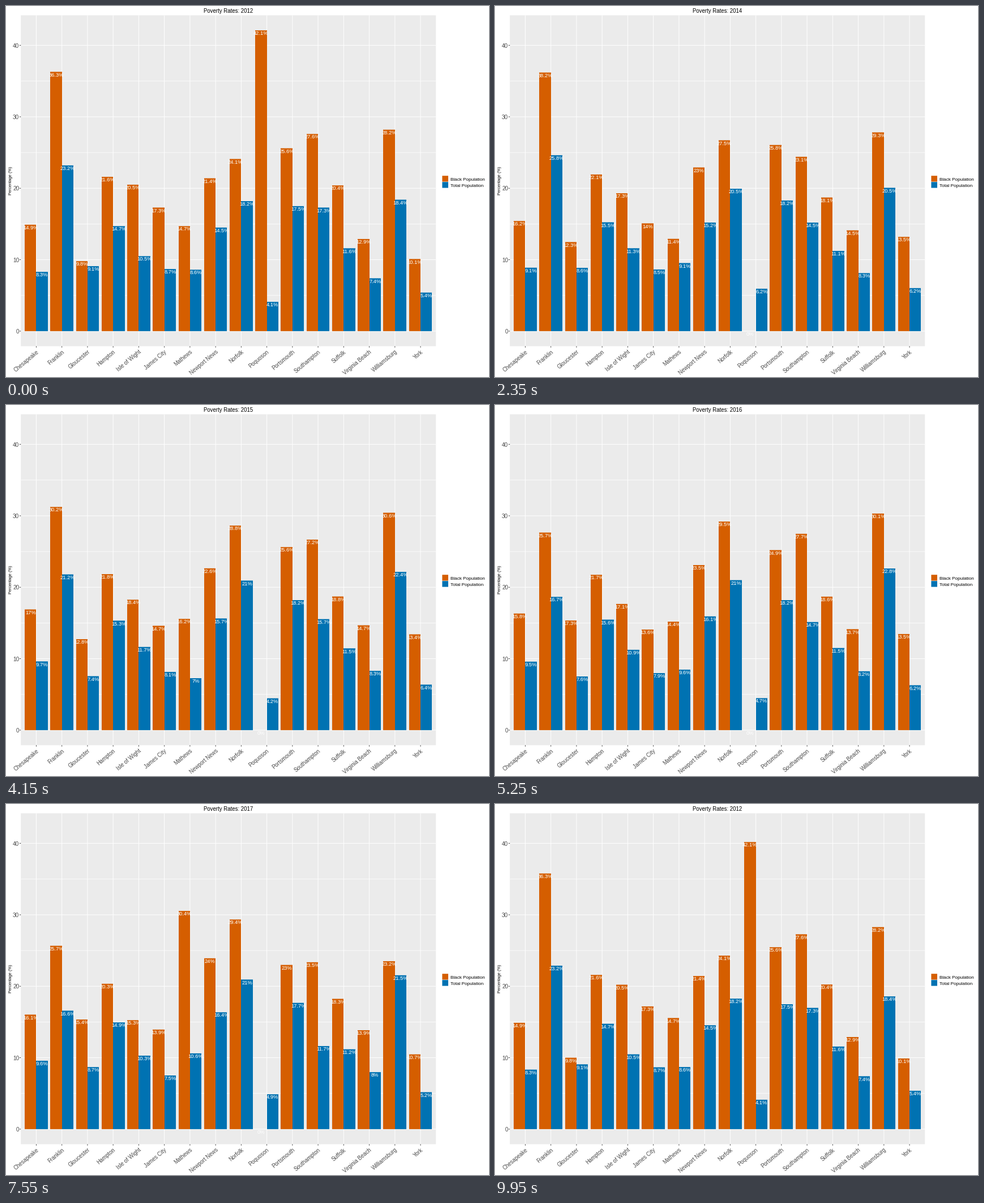
These frames come from a looping animation (853x656 px, 10000 ms). A matplotlib script:

```python
import numpy as np
import matplotlib.pyplot as plt
from matplotlib.animation import FuncAnimation
from matplotlib.patches import Rectangle

W, H, DPI = 853, 656, 100
FRAMES, INTERVAL = 200, 50
LEFT, RIGHT, TOP, BOTTOM = 26.3, 759.2, 16.5, 601.5
ORANGE, BLUE, PANEL = "#D55E00", "#0072B2", "#EBEBEB"

PLACES = ["Chesapeake", "Franklin", "Gloucester", "Hampton", "Isle of Wight",
          "James City", "Mathews", "Newport News", "Norfolk", "Poquoson",
          "Portsmouth", "Southampton", "Suffolk", "Virginia Beach",
          "Williamsburg", "York"]

# one row per year, 2012 to 2018
BLACK = np.array([
    [14.9, 36.3, 9.8, 21.6, 20.5, 17.3, 14.7, 21.4, 24.1, 42.1, 25.6, 27.6, 20.4, 12.9, 28.2, 10.1],
    [14.4, 33.6, 12.7, 21.7, 21.9, 16.5, 14.9, 22.8, 25.7, 0, 26.4, 26.1, 19.5, 13.6, 25.9, 12.8],
    [16.2, 38.2, 12.3, 22.1, 17.3, 14, 11.4, 23, 27.5, 0, 25.8, 23.1, 18.1, 14.5, 29.3, 13.5],
    [17, 30.2, 12.8, 21.8, 18.4, 14.7, 16.2, 22.6, 28.8, 0, 25.6, 27.2, 18.8, 14.7, 30.6, 13.4],
    [15.8, 25.7, 17.3, 21.7, 17.1, 13.6, 14.4, 23.5, 29.5, 0, 24.9, 27.7, 18.6, 13.7, 30.1, 13.5],
    [16.1, 25.7, 15.4, 20.3, 15.3, 13.9, 30.4, 24, 29.4, 0, 23, 23.5, 18.3, 13.9, 23.2, 10.7],
    [14.6, 25, 14.2, 21.4, 14.3, 14.7, 33.6, 22.2, 28.2, 0, 22.7, 20.5, 17, 12.8, 30, 5.6],
])
TOTAL = np.array([
    [8.3, 23.2, 9.1, 14.7, 10.5, 8.7, 8.6, 14.5, 18.2, 4.1, 17.5, 17.3, 11.6, 7.4, 18.4, 5.4],
    [8.6, 23.1, 9.2, 14.9, 12, 8.8, 10.1, 15.2, 19.2, 5.6, 18.4, 16.1, 11.4, 7.9, 19.5, 5.8],
    [9.1, 25.8, 8.6, 15.5, 11.3, 8.5, 9.1, 15.2, 20.5, 6.2, 18.2, 14.5, 11.1, 8.3, 20.5, 6.2],
    [9.7, 21.2, 7.4, 15.3, 11.7, 8.1, 7, 15.7, 21, 4.2, 18.2, 15.7, 11.5, 8.3, 22.4, 6.4],
    [9.5, 16.7, 7.6, 15.6, 10.9, 7.9, 9.6, 16.1, 21, 4.7, 18.2, 14.7, 11.5, 8.2, 22.8, 6.2],
    [9.6, 16.6, 8.7, 14.9, 10.3, 7.5, 10.6, 16.4, 21, 4.9, 17.7, 11.7, 11.2, 8, 21.5, 5.2],
    [9, 16.2, 8.5, 15.8, 10, 7.8, 10.8, 15.5, 19.7, 4.5, 17.2, 10.2, 10.8, 7.6, 22.4, 4.7],
])
YEARS = len(BLACK)

# frames where a year's hold begins and ends, and the year index there
KEYS = [0, 5, 28, 34, 57, 63, 86, 92, 115, 121, 144, 150, 172, 178, 200]
STATES = [i // 2 for i in range(len(KEYS))]

STEP = (RIGHT - LEFT) / (len(PLACES) + 0.2)
CENTRES = LEFT + STEP * (0.6 + np.arange(len(PLACES)))
Y_MAX = BLACK.max()
UNIT = (BOTTOM - TOP) / (Y_MAX * 1.1)
ZERO = BOTTOM - 0.05 * Y_MAX * UNIT

plt.rcParams["font.family"] = "Liberation Sans"
# the small surplus keeps the pixel size from rounding down
fig = plt.figure(figsize=((W + 0.01) / DPI, (H + 0.01) / DPI), dpi=DPI, facecolor="white")
ax = fig.add_axes([0, 0, 1, 1])
ax.set_xlim(0, W)
ax.set_ylim(H, 0)
ax.axis("off")


def y_px(value):
    return ZERO - value * UNIT


def box(x0, y0, x1, y1, color, z=0):
    patch = Rectangle((x0, y0), x1 - x0, y1 - y0, fc=color, lw=0, zorder=z, snap=False)
    return ax.add_patch(patch)


def line(x0, y0, x1, y1, color="white", width=0.9):
    ax.plot([x0, x1], [y0, y1], color=color, lw=width * 72 / DPI, zorder=1,
            solid_capstyle="butt", snap=False)


def write(x, y, s, px, color="black", ha="center", angle=0):
    return ax.text(x, y, s, fontsize=px * 72 / DPI, color=color, ha=ha, va="baseline",
                   rotation=angle, rotation_mode="anchor", zorder=3)


def draw_static():
    box(LEFT, TOP, RIGHT, BOTTOM, PANEL)
    for v in range(5, 41, 10):
        line(LEFT, y_px(v), RIGHT, y_px(v), width=0.8)
    for v in range(0, 41, 10):
        y = y_px(v)
        line(LEFT, y, RIGHT, y, width=1)
        line(LEFT - 2.4, y, LEFT, y, "#333333")
        write(23.2, y + 4.2, str(v), 10, "#4D4D4D", "right")
    for x, place in zip(CENTRES, PLACES):
        line(x, TOP, x, BOTTOM, width=1)
        line(x, BOTTOM, x, BOTTOM + 2.4, "#333333")
        write(x + 4.8, 612.6, place, 9.6, "#4D4D4D", "right", 40)
    write(10, 309.3, "Percentage (%)", 7.3, angle=90)
    for y, color, name in [(300.2, ORANGE, "Black"), (311.2, BLUE, "Total")]:
        box(770.4, y, 781, y + 10.4, color)
        write(785, y + 8.9, name + " Population", 8.2, ha="left")


def make_series(color, side):
    bars, labels = [], []
    for x in CENTRES:
        x0, x1 = sorted([round(x), round(x + side * 0.45 * STEP)])
        bars.append(box(x0, ZERO, x1, ZERO, color, 2))
        labels.append(write(x + side * 0.225 * STEP, ZERO, "", 9.35, "white"))
    return bars, labels


draw_static()
title = write((LEFT + RIGHT) / 2, 11.8, "", 9.6)
series = [(BLACK, *make_series(ORANGE, -1)), (TOTAL, *make_series(BLUE, 1))]


def update(n):
    pos = np.interp(n, KEYS, STATES)
    a = int(pos)
    part = pos - a
    b = (a + 1) % YEARS
    near = int(pos + 0.5 + 1e-9) % YEARS
    title.set_text(f"Poverty Rates: {2012 + near}")
    for data, bars, labels in series:
        values = data[a] * (1 - part) + data[b] * part
        for v, shown, bar, label in zip(values, data[near], bars, labels):
            bar.set_y(y_px(v))
            bar.set_height(v * UNIT)
            label.set_y(y_px(v) + 8.2)
            label.set_text(f"{shown:g}%")
    return []


anim = FuncAnimation(fig, update, frames=FRAMES, interval=INTERVAL,
                     init_func=lambda: update(0), repeat=True, repeat_delay=0)
plt.show()
```
